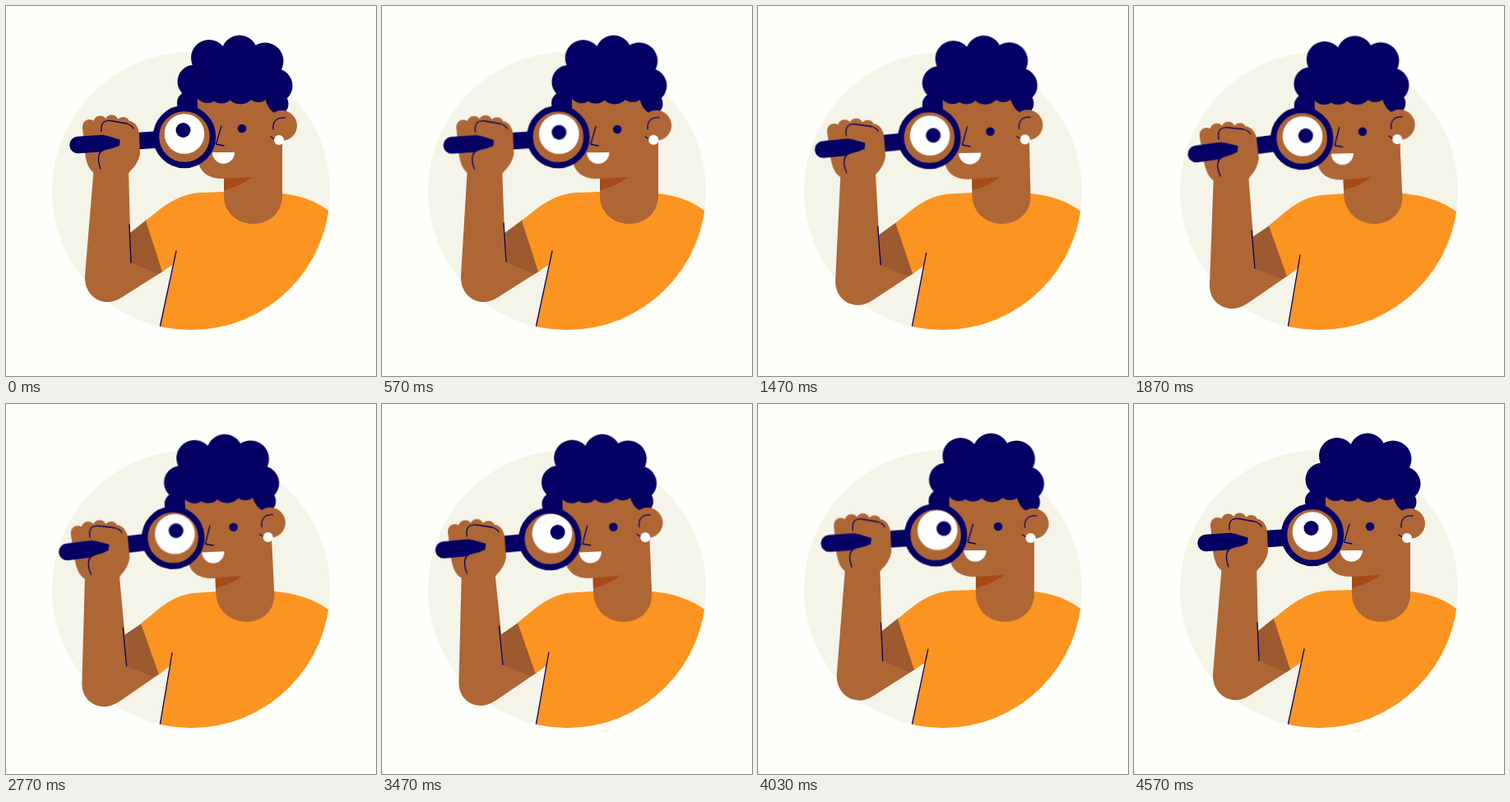
An HTML page without scripts for the animation above (4610 ms loop, 450x450 px).

```html
<!DOCTYPE html>
<html lang="en">
<head>
<meta charset="utf-8">
<title>Looking through a magnifier</title>
<style>
  :root {
    --navy: #050063;
    --skin: #ae6635;
    --swing: cubic-bezier(.42, 0, .58, 1);
    --dart: cubic-bezier(.7, 0, .3, 1);
  }
  html, body { margin: 0; width: 100%; height: 100%; overflow: hidden; background: #fefefa; }
  svg { display: block; width: 100vw; height: 100vh; }

  .navy { fill: var(--navy); }
  .skin { fill: var(--skin); }
  .shade { fill: #9c5a2e; }
  .white { fill: #fff; }
  .line { fill: none; stroke: var(--navy); stroke-width: 1.3; stroke-linecap: round; stroke-linejoin: round; }

  .head, .hand, .eye, .pupil, .gaze, .neck, .arm, .crook, .fold, .shirt, .seam {
    animation: 4610ms var(--swing) infinite;
  }
  .head { animation-name: head; transform-origin: 290px 145px; }
  .hand { animation-name: hand; transform-origin: 217px 159px; }
  .eye { animation-name: eye; }
  .pupil { animation-name: pupil; animation-timing-function: var(--dart); }
  .gaze { animation-name: gaze; animation-timing-function: var(--dart); }
  .neck { animation-name: neck; transform-origin: 300px 265px; }
  .arm { animation-name: arm; }
  .crook { animation-name: crook; }
  .fold { animation-name: fold; }
  .shirt { animation-name: shirt; }
  .seam { animation-name: seam; }

  /* Slow drift, lean left, slow drift, swing back. */
  @keyframes head {
    0% { transform: none; animation-timing-function: linear; }
    23.5% { transform: translate(-3.500px, 0) rotate(-.6deg); }
    41% { transform: translate(-12.300px, .5px) rotate(-2deg); animation-timing-function: linear; }
    69.4% { transform: translate(-15px, 1px) rotate(-2.8deg); }
    90%, 100% { transform: none; }
  }
  @keyframes hand {
    0% { transform: none; animation-timing-function: linear; }
    23.5% { transform: translate(-5px, .3px) rotate(-.2deg); }
    41% { transform: translate(-12.800px, 2px) rotate(-4deg); }
    52.7% { transform: translate(-13px, 2px) rotate(-4.2deg); }
    69.4% { transform: translate(-15px, 6px) rotate(-1.8deg); }
    91%, 100% { transform: none; }
  }
  @keyframes eye {
    0%, 99.1%, 100% { transform: none; }
    12.4% { transform: translate(1px, 0); }
    36.2% { transform: translate(.8px, 1px); }
    52.7% { transform: translate(2px, 1px); }
    69.4% { transform: translate(3px, -3.5px); }
    83.1% { transform: translate(2.5px, -3px); }
  }
  @keyframes pupil {
    0%, 99.1%, 100% { transform: none; }
    12.4% { transform: translate(1.5px, 2.5px); }
    36.2% { transform: translate(5.7px, 4.5px); }
    52.7% { transform: translate(1px, -1px); }
    69.4% { transform: translate(7.5px, 3.5px); }
    83.1% { transform: translate(10px, 3px); }
  }
  @keyframes gaze {
    0%, 99.1%, 100% { transform: none; }
    12.4% { transform: translate(1px, 1px); }
    36.2% { transform: translate(3px, 3.5px); }
    52.7% { transform: translate(2px, 0); }
    69.4% { transform: translate(7px, 0); }
    83.1% { transform: translate(6px, 0); }
  }
  @keyframes neck {
    0%, 23.5%, 89%, 100% { transform: none; }
    41%, 69.4% { transform: translate(-8px, 0) skewX(2.8deg); }
  }
  @keyframes arm {
    0%, 91%, 100% { d: path("M107 195L96 328C95 348 109 361 126 360C134 359 140 355 146 351L192 322L171 260L151 276L149 196Z"); }
    12.4%, 23.5% { d: path("M104 195L96 328C95 348 109 361 126 360C134 359 140 355 146 351L192 322L171 260L149 276L146 196Z"); }
    41%, 52.7% { d: path("M97 202L92 338C91 357 105 369 122 368C130 367 136 363 142 359L187 328L165 267L145 281L139 204Z"); }
    69.4% { d: path("M95 204L93 338C92 357 105 369 122 368C130 367 136 363 142 359L187 328L165 267L144 281L135 204Z"); }
  }
  @keyframes crook {
    0%, 23.5%, 90%, 100% { d: path("M151 276L171 260L192 322L185 326L152 312Z"); }
    41%, 69.4% { d: path("M144 281L165 267L187 328L180 332L146 319Z"); }
  }
  @keyframes fold {
    0%, 91%, 100% { d: path("M150 266L152 312"); }
    12.4%, 23.5% { d: path("M148 264L151 311"); }
    41%, 52.7% { d: path("M143 273L147 319"); }
    69.4% { d: path("M141 271L146 318"); }
  }
  @keyframes shirt {
    0%, 23.5%, 90%, 100% { d: path("M170 261C188 247 206 229 236 227L265 226L336 228C362 231 380 238 400 255L400 400L185 400L187 389L204 314L190 323Z"); }
    41%, 69.4% { d: path("M164 267C182 253 200 233 228 230L258 228L328 228C357 231 380 239 400 256L400 400L185 400L187 389L199 319L186 329Z"); }
  }
  @keyframes seam {
    0%, 23.5%, 90%, 100% { d: path("M207 298L187.5 389"); }
    41%, 69.4% { d: path("M202 303L187.5 389"); }
  }
</style>
</head>
<body>
<svg viewBox="0 0 450 450">
  <defs>
    <clipPath id="disc"><circle cx="225" cy="225" r="169"/></clipPath>
    <clipPath id="glass"><circle cx="217" cy="159" r="32"/></clipPath>
  </defs>
  <circle cx="225" cy="225" r="169" fill="#f5f4e8"/>

  <path class="arm skin" d="M107 195L96 328C95 348 109 361 126 360C134 359 140 355 146 351L192 322L171 260L151 276L149 196Z"/>
  <path class="crook shade" d="M151 276L171 260L192 322L185 326L152 312Z"/>
  <path class="fold line" d="M150 266L152 312"/>

  <g clip-path="url(#disc)">
    <path class="shirt" fill="#fc9422" d="M170 261C188 247 206 229 236 227L265 226L336 228C362 231 380 238 400 255L400 400L185 400L187 389L204 314L190 323Z"/>
    <path class="seam line" d="M207 298L187.5 389"/>
  </g>

  <g class="neck">
    <path class="skin" d="M265 190V231C265 251 281 265 300.5 265S336 251 336 231V150H300Z"/>
    <path fill="#a64a17" d="M265 205L301 207Q286 219 265 224Z"/>
  </g>

  <g class="head">
    <g class="navy">
      <circle cx="222" cy="118" r="14"/>
      <circle cx="329" cy="119" r="14.5"/>
    </g>
    <path class="skin" d="M233 105V186Q236 209 262 210L302 208L335 200V131H328Q318 126 315 112V95H240Z"/>
    <circle class="skin" cx="335.5" cy="145.5" r="18.5"/>
    <g class="navy">
      <circle cx="247" cy="63" r="22"/>
      <circle cx="284" cy="57.5" r="22"/>
      <circle cx="315" cy="67" r="22.5"/>
      <circle cx="327.5" cy="97" r="21"/>
      <circle cx="229" cy="92" r="20.5"/>
      <circle cx="245" cy="102" r="16"/>
      <circle cx="262" cy="103" r="15.5"/>
      <circle cx="285" cy="101" r="18.5"/>
      <circle cx="307" cy="101" r="16"/>
      <ellipse cx="280" cy="82" rx="48" ry="28"/>
    </g>
    <path class="line" d="M325 150C324 140 330 135 339 136M322 159L328 163M262 146L255.5 168L265 170"/>
    <circle class="white" cx="332" cy="163" r="6"/>
    <circle class="gaze navy" cx="287" cy="149" r="5.3"/>
    <path class="white" d="M251 178H278A13.5 13.8 0 0 1 251 178Z"/>
  </g>

  <g class="hand">
    <g class="skin">
      <circle cx="101.5" cy="146.5" r="8.5"/>
      <circle cx="114.500" cy="142" r="8.5"/>
      <circle cx="128.500" cy="141" r="8.5"/>
      <circle cx="142.500" cy="143" r="8"/>
      <path d="M93 147L106 144L150 142V203H107Q98 197 96 178Z"/>
    </g>
    <path d="M87.5 169L184 162.500" fill="none" stroke="var(--navy)" stroke-width="20.5" stroke-linecap="round"/>
    <path class="skin" d="M116 152C115 142 119 139 127 139L152 140Q161 144 162 156L163 180Q161 192 149 203H113L112 186Q112 176 122 174L138 170V163L122 158Q117 157 116 152Z"/>
    <path class="line" d="M116 153C115 142 119 139 127 139.5L147 143Q153 145 155 149M115 198C110 185 112 176 122 174C133 172 139 170 138 163L122 158"/>
    <circle class="skin" cx="217" cy="159" r="32"/>
    <g clip-path="url(#glass)">
      <g class="eye">
        <circle class="white" cx="217" cy="155.5" r="24.3"/>
        <circle class="pupil navy" cx="215.5" cy="151" r="9"/>
      </g>
    </g>
    <circle cx="217" cy="159" r="34.5" fill="none" stroke="var(--navy)" stroke-width="7.5"/>
  </g>
</svg>
</body>
</html>
```
